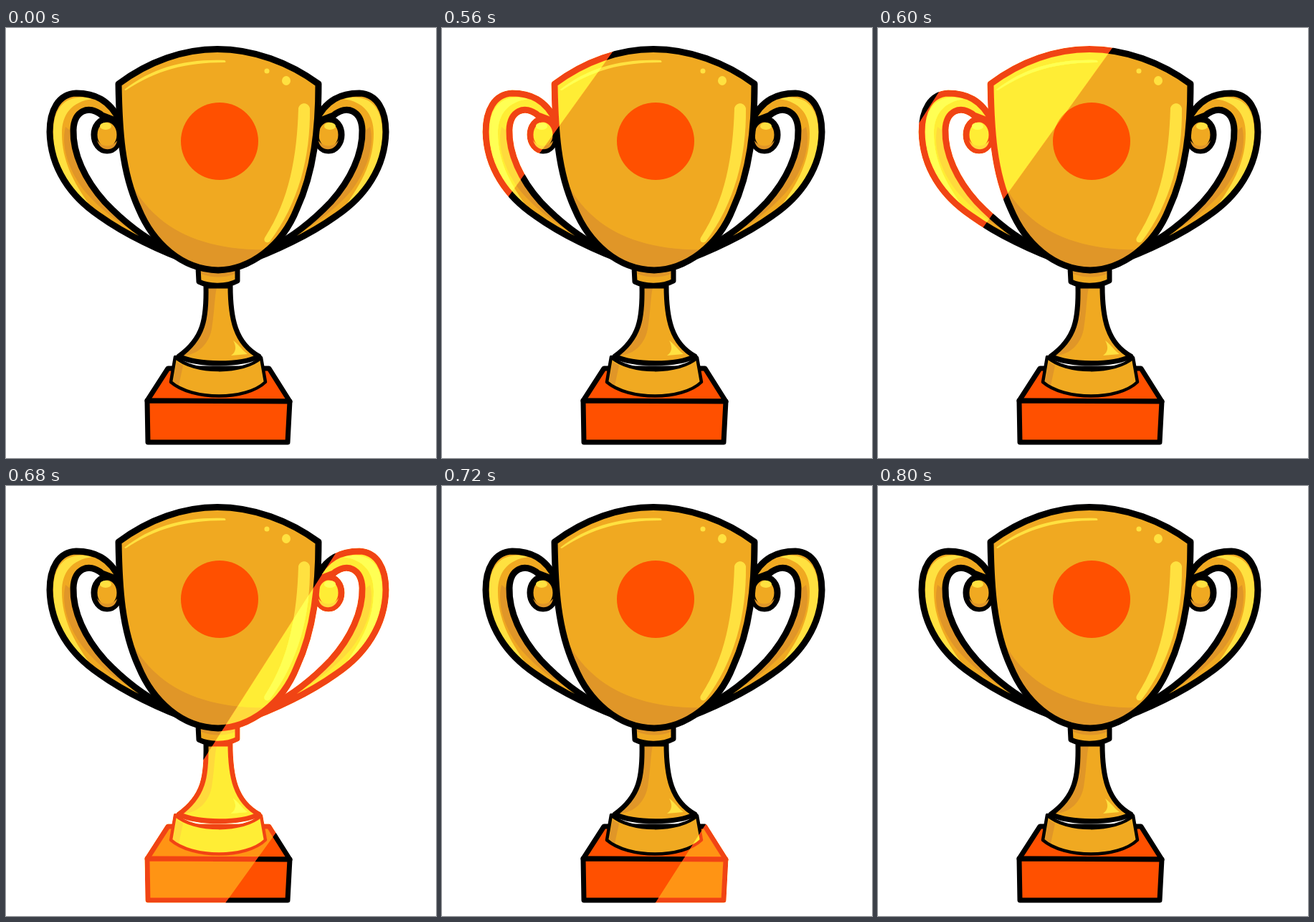
Animation, 600 px wide and 600 px high, one loop 1240 ms. Source, as an HTML page with a canvas:

```html
<!DOCTYPE html>
<html lang="en">
<head>
<meta charset="utf-8">
<title>Trophy shine</title>
<style>
  html, body { margin: 0; width: 100%; height: 100%; overflow: hidden; background: #fff; }
  canvas { display: block; width: 100vmin; height: 100vmin; }
</style>
</head>
<body>
<canvas id="stage" width="600" height="600"></canvas>
<script>
const ctx = document.getElementById('stage').getContext('2d');
const GOLD = '#f0a921', SHADE = '#e09628', LIGHT = '#ffe140', ORANGE = '#ff5000';
const LOOP = 1240, START = 480, STEP = 40;
// How far the shine has travelled at each step
const travel = [0, 48, 110, 195, 344, 573, 723, 808];

function fill(d, color) {
  ctx.fillStyle = color;
  ctx.fill(new Path2D(d));
}

function line(d, width) {
  ctx.lineWidth = width;
  ctx.strokeStyle = '#000';
  ctx.stroke(new Path2D(d));
}

function ellipse(x, y, rx, ry, color, width) {
  ctx.beginPath();
  ctx.ellipse(x, y, rx, ry, 0, 0, 7);
  ctx.fillStyle = color;
  ctx.fill();
  if (width) {
    ctx.lineWidth = width;
    ctx.strokeStyle = '#000';
    ctx.stroke();
  }
}

function handle() {
  const band = 'M160 132C145 99 122 91 98 91C73 92 61 115 61 145C62 195 90 235 130 262' +
    'C165 287 215 312 265 329L222 307C190 291 160 266 138 243C110 212 93 175 94 142C95 116 115 106 134 122Z';
  fill(band, GOLD);
  fill('M83 138C76 165 88 200 110 228C135 258 175 285 215 303C170 280 100 210 92 145Z', SHADE);
  fill('M66 145C66 105 90 91 120 99C92 103 78 120 78 147C78 185 94 215 116 246C82 220 66 190 66 145Z', LIGHT);
  line(band, 9);
  ellipse(141, 149, 18, 22, GOLD, 9);
  fill('M127 156C132 166 147 168 155 157C153 173 131 174 127 156Z', SHADE);
  ellipse(139, 137, 8, 5, LIGHT);
}

function base() {
  const top = 'M226 475H367L396 521L197 520Z';
  const front = 'M197 520L396 521L393 578H198Z';
  for (const d of [top, front]) {
    fill(d, ORANGE);
    line(d, 7);
  }
  const plate = 'M236 459C262 483 332 483 356 460L362 494C335 520 260 520 230 494Z';
  fill(plate, GOLD);
  fill('M238 466L247 471L241 499L233 493Z', SHADE);
  line(plate, 4.5);
}

function stem() {
  const body = 'M279 360C280 405 276 433 241 458C268 471 328 471 353 458C320 440 313 405 313 360Z';
  fill(body, GOLD);
  fill('M283 362H294C291 375 291 395 287 420C283 440 270 455 246 458C276 438 283 400 283 362Z', SHADE);
  fill('M317 436C327 444 329 449 337 455L314 457C321 452 322 445 317 436Z', LIGHT);
  line(body, 7);
  const ring = 'M268 334L269 354C283 361 308 361 323 353L323 334Z';
  fill(ring, GOLD);
  fill('M272 338H320V343C305 349 288 349 272 343Z', SHADE);
  line(ring, 7);
}

function cup() {
  const body = 'M157 78C200 46 248 29.5 295 29.5C345 29.5 395 48 436 78C436 140 430 200 406 252' +
    'C385 305 340 337 296 338C245 337 205 300 185 252C161 200 158 140 157 78Z';
  fill(body, GOLD);
  ctx.save();
  ctx.clip(new Path2D(body));
  fill('M155 165C175 240 225 315 378 309V345H150Z', SHADE);
  ctx.restore();
  fill('M165 86C205 55 250 43 305 45C307 46 307 48 305 48C250 48 210 59 167 87Z', LIGHT);
  fill('M408 112C410 103 422 103 424 112C425 180 408 245 368 298C362 302 358 296 362 291C395 240 406 180 408 112Z', LIGHT);
  ellipse(364, 60, 3.5, 3.5, LIGHT);
  ellipse(391, 73.5, 6, 6.5, LIGHT);
  ellipse(298, 158, 54, 54, ORANGE);
  line(body, 9);
}

function shine(offset) {
  const left = offset - 53, right = offset + 152;
  // Adding light leaves the white background white
  ctx.globalCompositeOperation = 'lighter';
  fill(`M${left} 0H${right}L${right - 432} 600H${left - 384}Z`, '#f04414');
  ctx.globalCompositeOperation = 'source-over';
}

function draw(now) {
  const step = Math.floor((now % LOOP - START) / STEP);
  ctx.fillStyle = '#fff';
  ctx.fillRect(0, 0, 600, 600);
  ctx.lineJoin = ctx.lineCap = 'round';
  handle();
  ctx.save();
  ctx.translate(591, 0);
  ctx.scale(-1, 1);
  handle();
  ctx.restore();
  base();
  stem();
  cup();
  if (step in travel) shine(travel[step]);
}

const begin = performance.now();
function tick() {
  draw(performance.now() - begin);
  requestAnimationFrame(tick);
}
tick();
</script>
</body>
</html>
```
